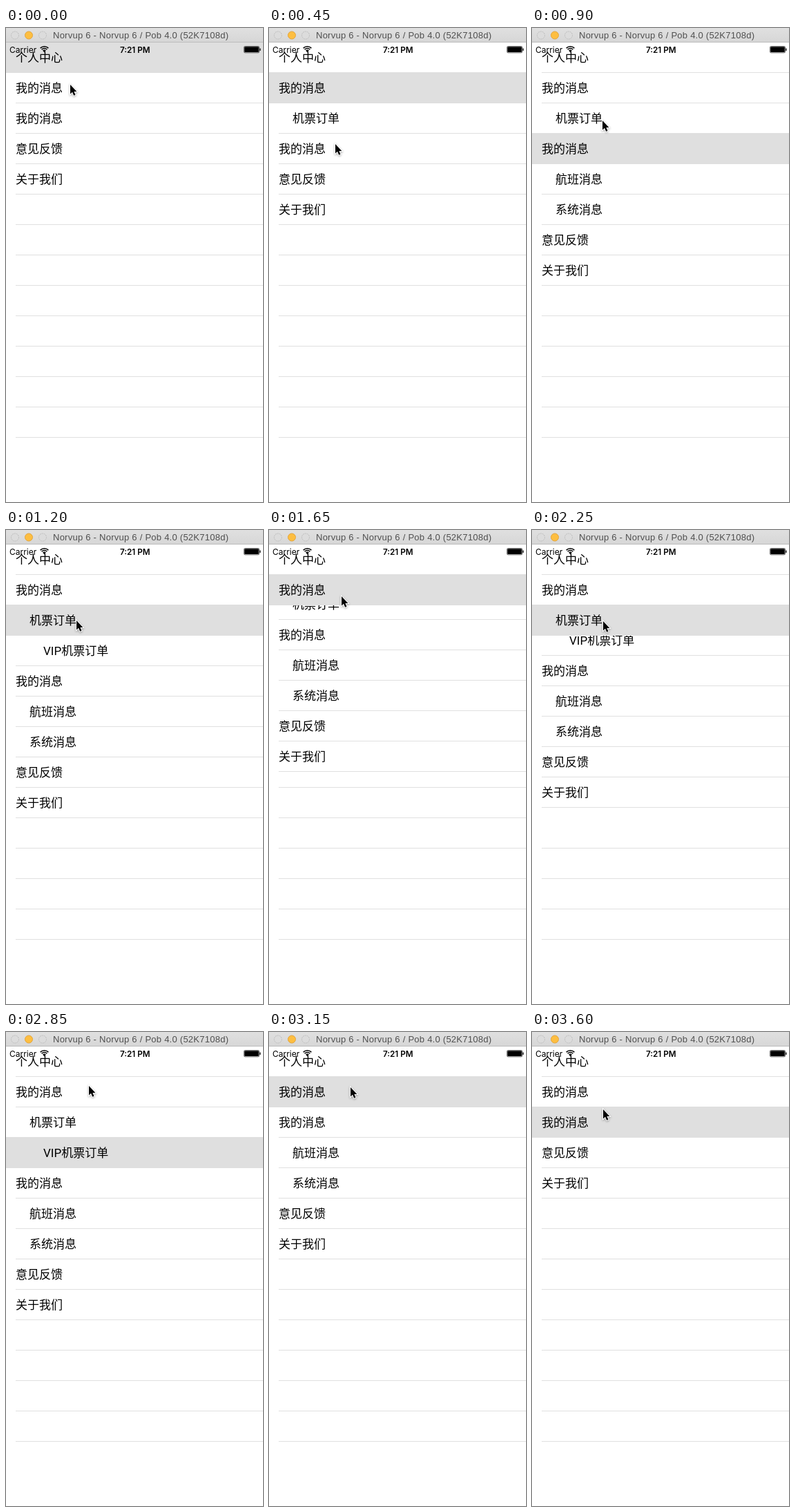
Animation, 372 px wide and 686 px high, one loop 3.75 s. Source, as an HTML page with a canvas:

```html
<!DOCTYPE html>
<html lang="zh-CN">
<head>
<meta charset="utf-8">
<title>Tree list</title>
<style>
  html, body { margin: 0; width: 100%; height: 100%; overflow: hidden; background: #fff; }
  canvas { display: block; }
</style>
</head>
<body>
<canvas id="stage" width="372" height="686"></canvas>
<script>
const ctx = document.getElementById('stage').getContext('2d');
const W = 372, H = 686, BAR = 21, ROW = 44;
const STEP = 150, STEPS = 25;
const GREY = '#dfdfdf', LINE = '#e0e0e0';

const node = (id, label, ...kids) => ({ id, label, kids });
const tree = [
  node('home', '个人中心'),
  node('inbox', '我的消息',
    node('flight', '机票订单', node('vip', 'VIP机票订单'))),
  node('notes', '我的消息',
    node('air', '航班消息'), node('system', '系统消息')),
  node('feedback', '意见反馈'),
  node('about', '关于我们'),
];

// Taps: step, row, whether it opens, pixels still hidden during the slide.
const taps = [
  [1, 'inbox', true, 15],
  [4, 'notes', true, 30],
  [7, 'flight', true, 15],
  [9, 'flight', false, 24],
  [11, 'inbox', false, 23],
  [13, 'inbox', true, 15],
  [15, 'flight', true, 15],
  [18, 'vip', true, 0],
  [20, 'inbox', false, 37],
  [23, 'notes', false, 85],
];

// Pointer tip at each step.
const pointer = [
  [93, 82], [93, 82], [98, 120], [96, 168], [96, 168],
  [98, 165], [102, 134], [102, 132], [102, 131], [102, 131],
  [104, 110], [105, 96], [105, 92], [105, 92], [104, 125],
  [103, 132], [109, 164], [112, 168], [112, 168], [120, 78],
  [120, 78], [118, 80], [105, 110], [103, 112], [103, 112],
];

function stateAt(step) {
  const s = { selected: 'home', open: {}, slide: {} };
  for (const [at, id, opens, hidden] of taps) {
    if (at > step) break;
    s.selected = id;
    s.open[id] = opens;
    if (at === step) s.slide[id] = hidden;
  }
  return s;
}

const countRows = (list, open) =>
  list.reduce((n, r) => n + 1 + (open[r.id] ? countRows(r.kids, open) : 0), 0);

function text(str, x, y, font, color = '#000', spacing = 0) {
  ctx.font = font;
  ctx.fillStyle = color;
  ctx.letterSpacing = spacing + 'px';
  ctx.fillText(str, x, y);
}

function line(y) {
  ctx.fillStyle = LINE;
  ctx.fillRect(14, y, W - 14, 1);
}

function drawRow(row, y, depth, selected) {
  if (row.id === selected) {
    ctx.fillStyle = GREY;
    ctx.fillRect(0, y - 1, W, ROW + 1);
  } else {
    line(y + ROW - 1);
  }
  text(row.label, 14 + 20 * depth, y + 28, '17px Roboto, "Noto Sans CJK SC", sans-serif');
}

// Draws a list from y down and returns the y below it.
function drawList(list, y, depth, s) {
  for (const row of list) {
    drawRow(row, y, depth, s.selected);
    y += ROW;
    const sliding = row.id in s.slide;
    if (row.kids.length && (s.open[row.id] || sliding)) {
      ctx.save();
      ctx.beginPath();
      ctx.rect(0, y - (sliding ? 0 : 1), W, H);
      ctx.clip();
      y = drawList(row.kids, y - (s.slide[row.id] || 0), depth + 1, s);
      ctx.restore();
    }
  }
  return y;
}

function disc(x, fill, edge, dash) {
  ctx.beginPath();
  ctx.arc(x, 10.5, 5.5, 0, Math.PI * 2);
  ctx.fillStyle = fill;
  ctx.fill();
  ctx.strokeStyle = edge;
  ctx.lineWidth = 1;
  ctx.setLineDash(dash);
  ctx.stroke();
  ctx.setLineDash([]);
}

function drawTitleBar() {
  const g = ctx.createLinearGradient(0, 0, 0, BAR);
  g.addColorStop(0, '#e0e0e0');
  g.addColorStop(1, '#d6d6d6');
  ctx.fillStyle = g;
  ctx.fillRect(0, 0, W, BAR);
  ctx.fillStyle = '#bcbcbc';
  ctx.fillRect(0, BAR - 1, W, 1);
  disc(13, '#dcdcdc', '#bdbdbd', [2, 1]);
  disc(33, '#fdbe41', '#e2a640', []);
  disc(53, '#dcdcdc', '#bdbdbd', [2, 1]);
  text('Norvup 6 - Norvup 6 / Pob 4.0 (52K7108d)', 68, 15,
    '13px "Liberation Sans", sans-serif', '#505050', 0.25);
}

function drawStatus() {
  text('Carrier', 5, 35.5, '12px Inter, sans-serif');
  text('7:21 PM', 165, 35.5, '600 11.7px Inter, sans-serif');

  // signal fan
  ctx.strokeStyle = '#000';
  ctx.lineWidth = 1.5;
  for (const r of [8.3, 5.5]) {
    ctx.beginPath();
    ctx.arc(55.5, 35, r, -Math.PI * 0.75, -Math.PI * 0.25);
    ctx.stroke();
  }
  ctx.fillStyle = '#000';
  ctx.beginPath();
  ctx.moveTo(55.5, 35.5);
  ctx.arc(55.5, 35, 3.4, -Math.PI * 0.75, -Math.PI * 0.25);
  ctx.fill();

  // battery
  ctx.lineWidth = 0.6;
  ctx.beginPath();
  ctx.roundRect(344.4, 26.5, 22.2, 9.4, 1.8);
  ctx.stroke();
  ctx.beginPath();
  ctx.roundRect(345.2, 27.3, 20.6, 7.8, 1);
  ctx.fill();
  ctx.fillRect(367.2, 29.5, 1.3, 3.4);
}

function drawPointer([x, y]) {
  const arrow = new Path2D('M0 0V13.6L3 10.8L5.2 15.8L7.5 14.8L5.4 10H9.4Z');
  ctx.save();
  ctx.translate(x, y);
  ctx.strokeStyle = '#fff';
  ctx.lineWidth = 2;
  ctx.shadowColor = 'rgba(0,0,0,.35)';
  ctx.shadowBlur = 3;
  ctx.shadowOffsetY = 1;
  ctx.stroke(arrow);
  ctx.shadowColor = 'transparent';
  ctx.fillStyle = '#000';
  ctx.fill(arrow);
  ctx.restore();
}

function draw(step) {
  const s = stateAt(step);
  ctx.fillStyle = '#fff';
  ctx.fillRect(0, 0, W, H);
  drawList(tree, BAR, 0, s);
  for (let k = countRows(tree, s.open) + 1; k <= 13; k++) line(BAR + ROW * k - 1);
  drawTitleBar();
  drawStatus();
  drawPointer(pointer[step]);
}

const start = performance.now();
function tick() {
  draw(Math.floor((performance.now() - start) / STEP) % STEPS);
  requestAnimationFrame(tick);
}
tick();
</script>
</body>
</html>
```
